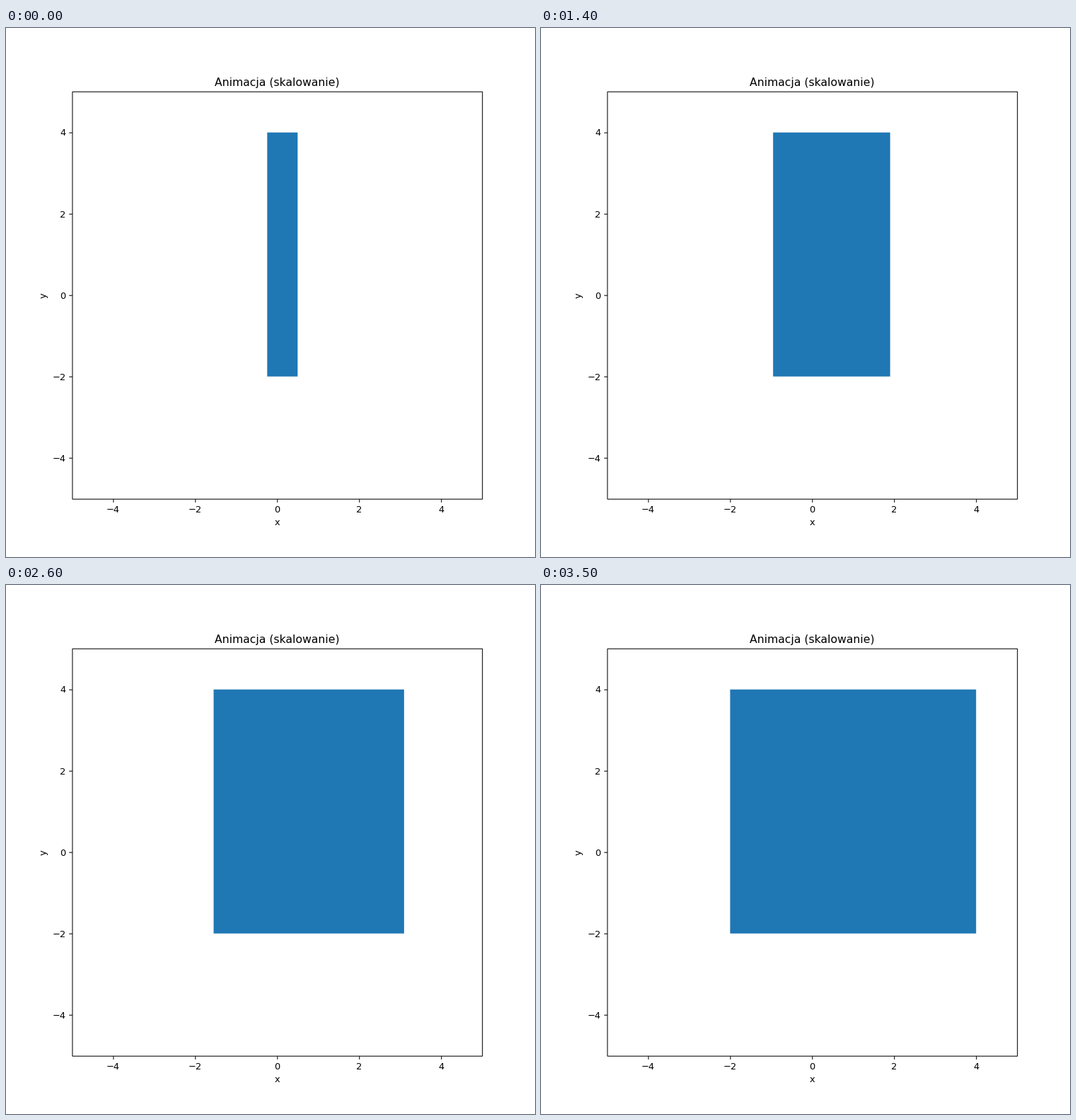
A matplotlib script that plays this animation: 748x748 px, repeating every 3.6 s.

```python
import math

import matplotlib.pyplot as plt
from matplotlib.animation import FuncAnimation
from matplotlib.lines import Line2D
from matplotlib.patches import Rectangle
from matplotlib.transforms import Affine2D

INCHES, GRID, STAGE = 8, 800, 748
FRAMES, INTERVAL = 36, 100
BOTTOM, TOP = -2, 4

# Shapes sit on an 800-unit grid that is shown smoothly scaled to the stage
X0, Y0 = 410, 396          # grid position of the data origin
XU, YU = 62, 61.6          # grid units per data unit
LEFT, BASE, WIDTH, HEIGHT = 100.5, 87.5, 620, 616
TICK = 5

fig = plt.figure(figsize=(INCHES, INCHES), dpi=STAGE / INCHES)
ax = fig.add_subplot(xlim=(-5, 5), ylim=(-5, 5), xlabel="x", ylabel="y",
                     title="Animacja (skalowanie)")
grid = Affine2D().scale(INCHES / GRID) + fig.dpi_scale_trans
ticks = [-4, -2, 0, 2, 4]
ax.set_xticks(ticks)
ax.set_yticks(ticks)
ax.tick_params(color="none")
ax.spines[:].set_color("none")


def snap(value):
    return math.floor(value + 0.5)


def box(x, y, w, h, **style):
    return ax.add_patch(Rectangle((x, y), w, h, transform=grid, snap=False,
                                  clip_on=False, **style))


def line(xs, ys):
    ax.add_artist(Line2D(xs, ys, transform=grid, snap=False, clip_on=False,
                         color="black", lw=0.8, solid_capstyle="butt"))


def span(frame):
    """Left and right grid edges of the shape, scaled along x."""
    right = 0.5 + 0.1 * frame
    return X0 + snap(-XU * right / 2), X0 + snap(XU * right)


low, high = Y0 + snap(YU * BOTTOM), Y0 + snap(YU * TOP)
left, right = span(0)
shape = box(left, low, right - left, high - low, facecolor="C0", lw=0)
box(LEFT, BASE, WIDTH, HEIGHT, fill=False, edgecolor="black", lw=0.8, zorder=2.5)
for t in ticks:
    x, y = X0 + 0.5 + XU * t, Y0 - 0.5 + snap(YU * t)
    line([x, x], [BASE - TICK, BASE])
    line([LEFT - TICK, LEFT], [y, y])


def update(frame):
    left, right = span(frame)
    shape.set_x(left)
    shape.set_width(right - left)
    return (shape,)


anim = FuncAnimation(fig, update, frames=FRAMES, interval=INTERVAL,
                     repeat=True, repeat_delay=0, blit=False)
plt.show()
```
